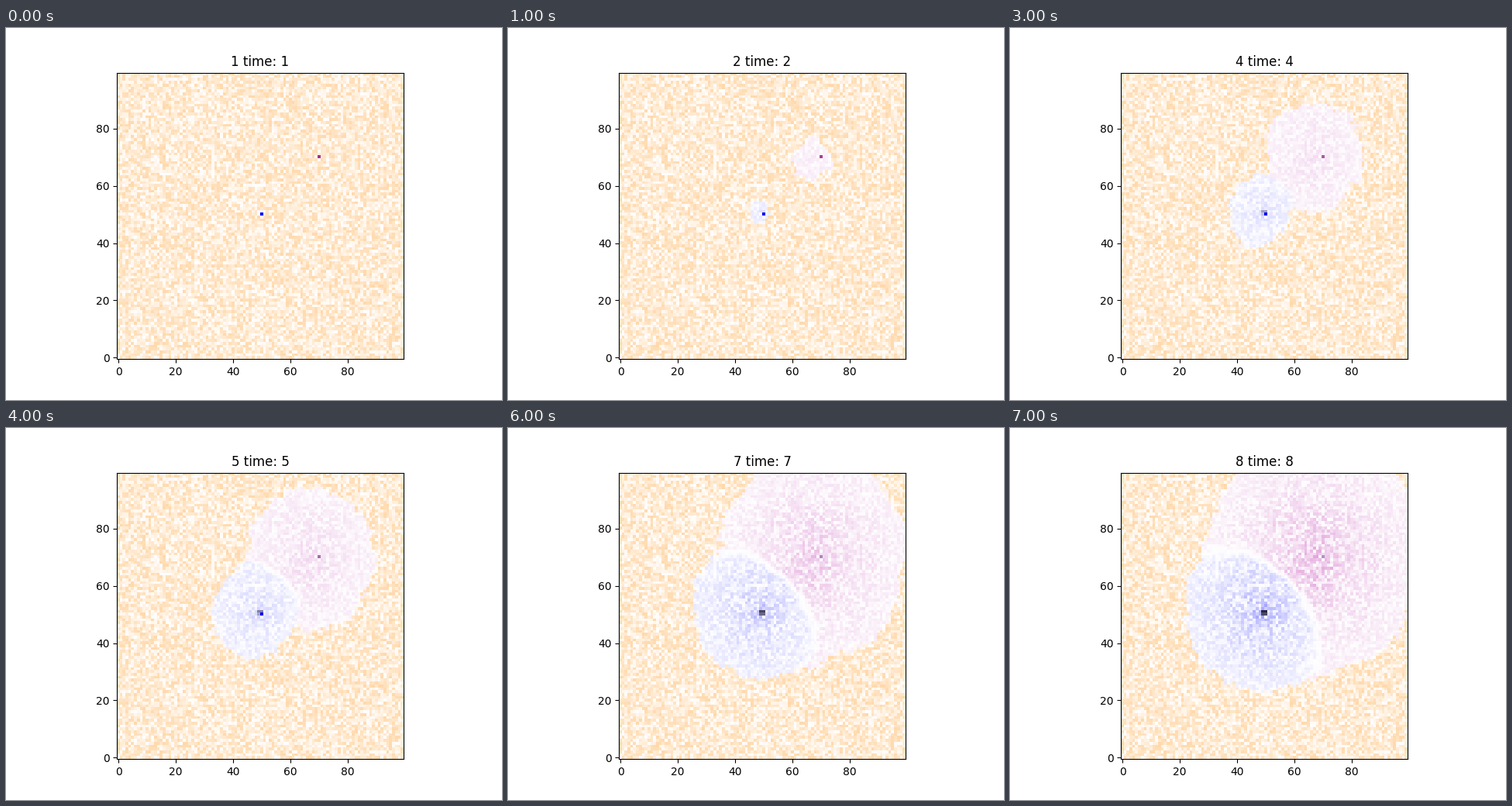
A matplotlib script for the animation above (8 s loop, 640x480 px).

```python
import numpy as np
import matplotlib.pyplot as plt
from matplotlib.animation import FuncAnimation

SIZE = 100
STEPS = 8
INK_SOIL = np.array([0, 38, 84])
INK_PINK = np.array([25, 81, 31])
INK_BLUE = np.array([87, 87, 0])
SEED_START = np.array([165, 50, 142])
SEED_END = np.array([172, 150, 200])

rng = np.random.RandomState(7)
yy, xx = np.mgrid[:SIZE, :SIZE]


def patches(width):
    """Smooth noise with patches about `width` cells wide, unit spread."""
    freq = np.fft.fftfreq(SIZE)
    falloff = np.exp(-2 * (np.pi * width) ** 2 * (freq[:, None] ** 2 + freq ** 2))
    noise = np.fft.ifft2(np.fft.fft2(rng.randn(SIZE, SIZE)) * falloff).real
    return noise / noise.std()


grain = rng.rand(SIZE, SIZE)
delay = 0.08 * rng.randn(SIZE, SIZE) + 0.1 * patches(1) + 0.16 * patches(3)
clump = np.clip(1 + 0.22 * patches(1.2), 0.4, 1.6)


def colony(cx, cy, start, speed):
    """Distance from the centre and the time the growing front gets there."""
    dx, dy = xx - cx, yy - cy
    dist = np.hypot(dx, dy)
    angle = np.arctan2(dy, dx)
    # Growth is a little faster up and down than sideways.
    stretch = 1 + 0.05 * np.cos(2 * (angle - 1.48)) + 0.03 * np.sin(angle)
    return dist, 1 + (dist / stretch - start) / speed + delay


pink_dist, pink_time = colony(67, 69, 2, 5.4)
blue_dist, blue_time = colony(48, 51, 0.6, 3.85)

# Positive where blue holds the ground against pink.
margin = 0.5 * pink_dist + 8.6 - blue_dist + 0.5 * patches(1)

soil = 255 - grain[..., None] * INK_SOIL


def tint(age, ink, fade):
    age = np.maximum(age, 0)
    strength = 0.25 + 0.06 * age + 0.35 * clump * (age / 6.5) ** 3
    return 255 - (grain * strength * fade)[..., None] * ink


def draw_seeds(grid, t):
    level = 255 - 30.5 * (t - 1)
    grid[50:52, 49:51] = level, level - 4, level + 28
    grid[50, 49:51] += 35
    if t <= 5:
        grid[50, 50] = 0, 0, 255
    grid[70, 70] = SEED_START + (SEED_END - SEED_START) * (t - 1) / (STEPS - 1)


def field(t):
    has_pink, has_blue = pink_time <= t, blue_time <= t
    both = has_pink & has_blue
    fade = np.where(both, np.clip(np.abs(margin) / 2.5, 0, 1), 1)
    show_blue = has_blue & (~has_pink | (margin > 0))
    show_pink = has_pink & ~show_blue
    grid = np.where(show_pink[..., None], tint(t - pink_time, INK_PINK, fade), soil)
    grid = np.where(show_blue[..., None], tint(t - blue_time, INK_BLUE, fade), grid)
    draw_seeds(grid, t)
    return np.clip(grid, 0, 255).astype(np.uint8)


fig, ax = plt.subplots(figsize=(6.4, 4.8), dpi=100)
image = ax.imshow(field(1), origin="lower", interpolation="nearest")
ax.set_xticks(range(0, SIZE, 20))
ax.set_yticks(range(0, SIZE, 20))
title = ax.set_title("")


def update(i):
    t = i + 1
    image.set_data(field(t))
    title.set_text(f"{t} time: {t}")
    return image, title


anim = FuncAnimation(fig, update, frames=STEPS, interval=1000, repeat=True, blit=False)
plt.show()
```
